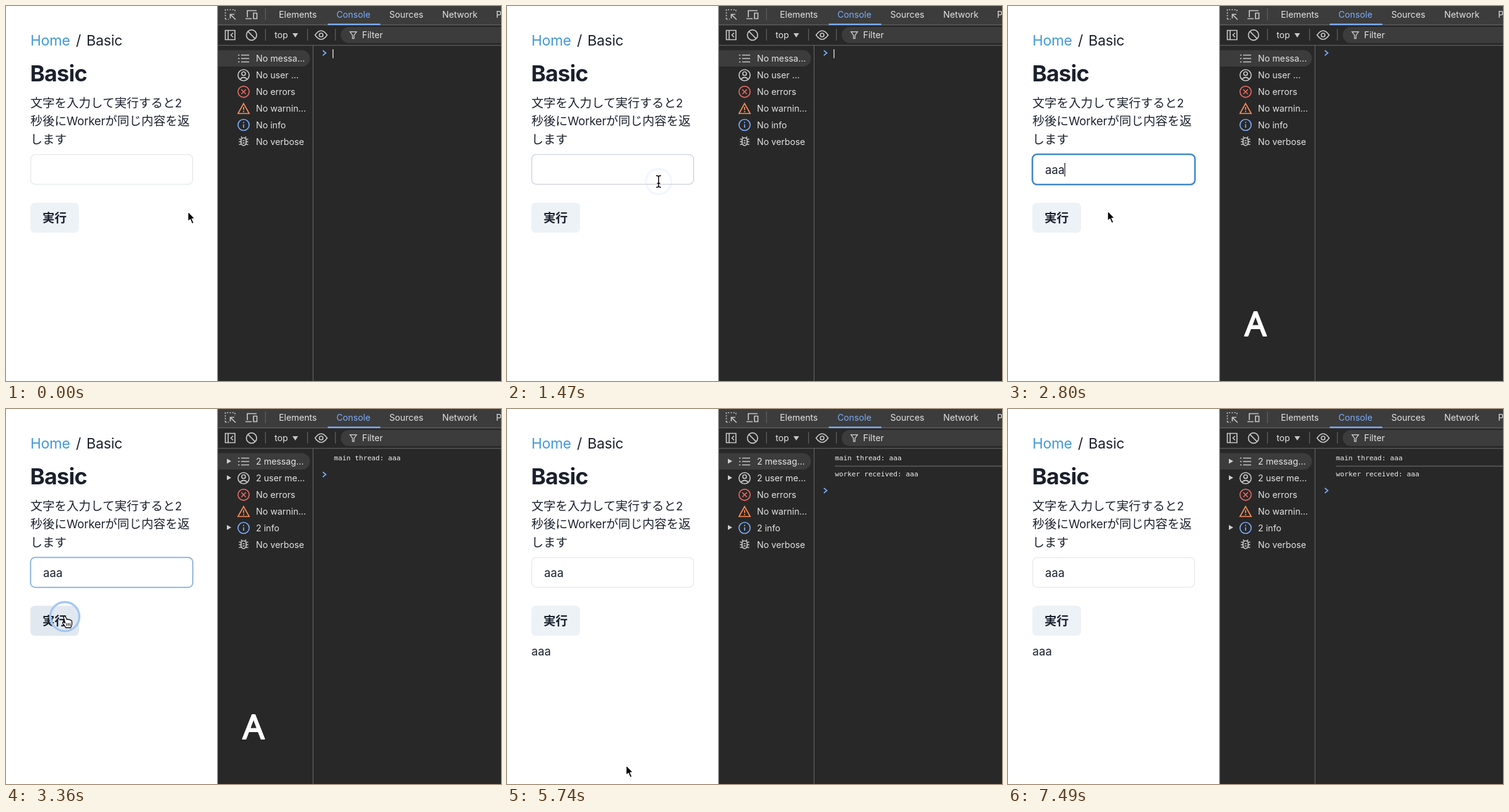
Write an HTML page that moves like this. It is 800x607 px and loops after 7.56 s.

```html
<!DOCTYPE html>
<html lang="ja">
<head>
<meta charset="utf-8">
<title>Worker demo</title>
<style>
html, body { margin: 0; width: 100%; height: 100%; overflow: hidden; background: #fff; }
svg { display: block; width: 800px; height: 607px; }
text { font-family: Inter, 'Noto Sans CJK JP', 'Noto Sans CJK', sans-serif; white-space: pre; }
#page text { fill: #1a202c; }
.body { font-size: 19.5px; }
.latin { font-size: 18.6px; }
.nav { font-size: 23.2px; letter-spacing: -.25px; }
#tools text { font-size: 14.2px; fill: #e3e3e3; }
#tools .log { font: 11.2px 'DejaVu Sans Mono', monospace; fill: #f0f0f0; }
#tools .key { font: 55px 'Noto Sans', sans-serif; fill: #fff; stroke: #fff; stroke-width: 2; stroke-linejoin: round; }
.icon { fill: none; stroke: #c7c7c7; stroke-width: 1.7; }
.sep { stroke: #5e5e5e; stroke-width: 1.3; fill: none; }
</style>
</head>
<body>
<svg viewBox="0 0 800 607">
  <g id="page">
    <text class="nav" x="39.5" y="64" style="fill:#4299d8">Home</text>
    <text class="nav" x="113" y="64">/</text>
    <text class="nav" x="130" y="64">Basic</text>
    <text x="39" y="121.5" font-size="36" font-weight="700" letter-spacing="-.8">Basic</text>
    <text class="body" x="39.5" y="164">文字を入力して実行すると<tspan class="latin">2</tspan></text>
    <text class="body" x="39.5" y="193.3">秒後に<tspan class="latin" letter-spacing="-.2">Worker</tspan>が同じ内容を返</text>
    <text class="body" x="39.5" y="222.5">します</text>
    <rect id="field" x="40" y="240.5" width="261.6" height="48" rx="7" fill="#fff" stroke-width="1.2"/>
    <rect id="focus" fill="none" stroke="#3d85cc" rx="7.5"/>
    <text id="typed" class="latin" x="60" y="272"></text>
    <path id="caret" stroke="#1a202c" stroke-width="1.3"/>
    <rect id="button" x="39.4" y="318.4" width="78.6" height="48.6" rx="7"/>
    <text class="body" x="59" y="350" font-weight="700">実行</text>
    <text id="output" class="latin" x="39.5" y="399">aaa</text>
  </g>

  <g id="tools">
    <path fill="#282828" d="M342 0H800V607H342Z"/>
    <path fill="#3c3c3c" d="M342 0H800V30H342ZM800 34H554a13 13 0 0 0 0 26H800ZM343 71.5H478a13.2 13.2 0 0 1 0 26.4H343Z"/>
    <path class="sep" d="M342.2 0V607M342 30.5H800M342 63.6H800M496.3 64V607M419.4 4V23M419.4 37V56M487.4 37V56M532.4 37V56"/>
    <path fill="#7cacf8" d="M520 28.6H605V31H520Z"/>
    <text x="441" y="19">Elements</text>
    <text x="534" y="19" style="fill:#7cacf8">Console</text>
    <text x="619.5" y="19">Sources</text>
    <text x="705" y="19">Network</text>
    <text x="792" y="19">Performance</text>
    <text x="434" y="52">top</text>
    <path fill="#c7c7c7" d="M463 44H472L467.500 51Z"/>
    <text x="575.500" y="52">Filter</text>
    <g class="icon">
      <path d="M354.500 21V6H370V11" stroke-dasharray="2 2.4"/>
      <path d="M354.500 21.500H360" stroke-dasharray="2 2.4"/>
      <path d="M371 22L363 14M362.500 20V13.500H369"/>
      <path d="M390 18V7.500H405M387 20.500H397M400 11.500H405.500V20.500H400Z"/>
      <path d="M354.500 39.500H370V54.500H354.500ZM359 39.500V54.500M367 43.500L363.500 47L367 50.500"/>
      <circle cx="396.800" cy="47" r="8.300"/><path d="M391 41.200L402.600 52.800"/>
      <path d="M499.500 47Q509.300 33 519 47Q509.300 61 499.500 47Z"/><circle cx="509.300" cy="47" r="3"/>
      <path d="M556 41.800H566.500L562.500 47.300V52.500H560V47.300Z" stroke-width="1.400"/>
      <path d="M375 79.500H377.500M375 85H377.500M375 90.500H377.500M380 79.500H393M380 85H393M380 90.500H393"/>
      <circle cx="384" cy="112" r="9"/><circle cx="384" cy="109.500" r="3"/><path d="M378 118.500Q384 112.500 390 118.500"/>
      <g stroke="#e46962"><circle cx="384" cy="138.800" r="9"/><path d="M380.300 135.100L387.700 142.500M387.700 135.100L380.300 142.500"/></g>
      <path stroke="#fe8d59" d="M384 157.800L393 174H375ZM384 163.500V168.500M384 170V172"/>
      <g stroke="#7cacf8"><circle cx="384" cy="192.500" r="9"/><path d="M384 187.500V189.500M384 191.500V197"/></g>
      <path d="M380 215.500Q384 211 388 215.500V223Q384 229 380 223ZM380 211.500L382 214M388 211.500L386 214M376.500 215.500H380M376.500 219.700H380M376.500 224H380M388 215.500H391.500M388 219.700H391.500M388 224H391.500M382.300 218H385.700M382.300 221.700H385.700"/>
    </g>
    <g id="rows"></g>
    <path id="arrows" fill="#d0d0d0" d="M357 80.500L364 84.500L357 88.500ZM357 107.300L364 111.300L357 115.300ZM357 187.800L364 191.800L357 195.800Z"/>
    <text id="mainLog" class="log" x="530" y="83">main thread: aaa</text>
    <g id="workerLog">
      <path class="sep" d="M530 92.500H800" stroke-width="1"/>
      <text class="log" x="530" y="109">worker received: aaa</text>
    </g>
    <path id="prompt" fill="none" stroke="#7cacf8" stroke-width="1.700" d="M512 -4L517 0L512 4"/>
    <path id="consoleCaret" stroke="#e8e8e8" stroke-width="1.300" d="M528.500 70V84.500"/>
    <text id="key" class="key" x="400" y="534" text-anchor="middle">A</text>
  </g>

  <circle id="ring" fill="none" stroke="#a3c8f3" stroke-width="3.500"/>
  <g id="pointer" stroke-linejoin="round">
    <path id="arrow" fill="#000" stroke="#fff" stroke-width="1.300" d="M0 -.5V16L3.700 12.600L6.700 19.500L9.600 18.200L6.600 11.500H11.500Z"/>
    <g id="beam" fill="none">
      <path stroke="#fff" stroke-width="3" d="M0 -8V8"/>
      <path stroke="#000" stroke-width="1.500" d="M-4 -9.500Q0 -9.500 0 -7Q0 -9.500 4 -9.500M0 -7V7M-4 9.500Q0 9.500 0 7Q0 9.500 4 9.500M-2.500 3H2.500"/>
    </g>
    <g id="hand" stroke="#000" stroke-width="1.300">
      <path fill="#fff" d="M-2 1Q-1.500 -1.500 1 0L3.500 5Q4.500 3.500 6 5Q7.500 4 8.500 5.800Q11 5 11.500 8V12Q11 15 9.500 18H1.500Q0 14.500 -3 11.500Q-4.500 9 -1.500 9L.5 10.500Z"/>
      <path d="M3 10.500V15M5.700 10.500V15M8.400 10.500V15" stroke-width="1.100"/>
    </g>
  </g>
</svg>
<script>
const LOOP = 7560, STEP = 70;
const $ = id => document.getElementById(id);
const set = (id, attrs) => { for (const k in attrs) $(id).setAttribute(k, attrs[k]); };
const show = (id, on) => set(id, { opacity: +on });
const ramp = (t, a, b) => Math.min(1, Math.max(0, (t - a) / (b - a)));

const idle = ['No messa…', 'No user …', 'No errors', 'No warnin…', 'No info', 'No verbose'];
const logged = { 0: '2 messag…', 1: '2 user me…', 4: '2 info' };
$('rows').innerHTML = idle.map((s, i) => `<text x="404" y="${90 + i * 26.9}">${s}</text>`).join('');
const rows = [...$('rows').children];

// time, x, y of the pointer tip
const path = [
  [0, 294, 333], [840, 294, 333], [1400, 245, 284], [2450, 245, 284],
  [2800, 161, 332], [3150, 95, 336], [5250, 95, 336], [5740, 192.5, 577],
  [6090, 192.5, 577], [6420, 85, 487], [6790, 24, 612], [LOOP, 24, 640]
];
const keyTimes = [2170, 2380, 2590];
const clicks = [[1455, 245, 284], [3220, 95, 336]];

function pointerAt(t) {
  const i = path.findIndex(p => p[0] > t);
  const [a, b] = [path[i - 1], path[i]];
  const p = ramp(t, a[0], b[0]), e = p * p * (3 - 2 * p);
  return [a[1] + (b[1] - a[1]) * e, a[2] + (b[2] - a[2]) * e];
}

function drawPointer(t) {
  const [x, y] = pointerAt(t);
  const inside = (l, top, r, bottom) => x > l && x < r && y > top && y < bottom;
  const overField = inside(39, 240, 302, 289), overButton = inside(39, 318, 118, 367);
  set('pointer', { transform: `translate(${x} ${y})` });
  show('beam', overField);
  show('hand', overButton);
  show('arrow', !overField && !overButton);
  set('field', { stroke: overField ? '#c5cad8' : '#e2e5ea' });
  set('button', { fill: overButton ? '#e2e8f0' : '#edf2f7' });

  const click = clicks.find(c => t >= c[0] && t < c[0] + 400);
  show('ring', false);
  if (click) {
    const age = t - click[0];
    set('ring', {
      cx: click[1], cy: click[2], r: 20 + 3.5 * ramp(age, 0, 100),
      opacity: ramp(age, 0, 100) * (1 - ramp(age, 220, 400))
    });
  }
}

function drawField(t) {
  const focus = ramp(t, 1470, 1670) * (1 - ramp(t, 3270, 3470));
  const grow = .6 * focus;
  set('focus', {
    x: 40 - grow, y: 240.5 - grow, width: 261.6 + 2 * grow, height: 48 + 2 * grow,
    'stroke-width': 1.2 + 1.3 * focus, opacity: focus
  });
  const typed = keyTimes.filter(k => t >= k);
  $('typed').textContent = 'a'.repeat(typed.length);
  const last = typed.length ? typed[typed.length - 1] : 1540;
  const x = 60.5 + (typed.length ? $('typed').getComputedTextLength() : 0);
  set('caret', { d: `M${x} 254V276` });
  show('caret', t >= 1540 && t < 3270 && (t - last) % 1000 < 500);
  show('output', t >= 5290);
}

function drawConsole(t) {
  const main = t >= 3290, worker = t >= 3430;
  rows.forEach((row, i) => row.textContent = main && logged[i] || idle[i]);
  show('arrows', main);
  show('mainLog', main);
  show('workerLog', worker);
  set('prompt', { transform: `translate(0 ${worker ? 132 : main ? 106 : 76})` });
  show('consoleCaret', t < 1540 && t % 1000 < 500);
  set('key', { opacity: ramp(t, 2100, 2170) * (1 - ramp(t, 3560, 3920)) });
}

function frame() {
  const t = Math.floor(performance.now() % LOOP / STEP) * STEP;
  drawPointer(t);
  drawField(t);
  drawConsole(t);
  requestAnimationFrame(frame);
}
frame();
</script>
</body>
</html>
```
